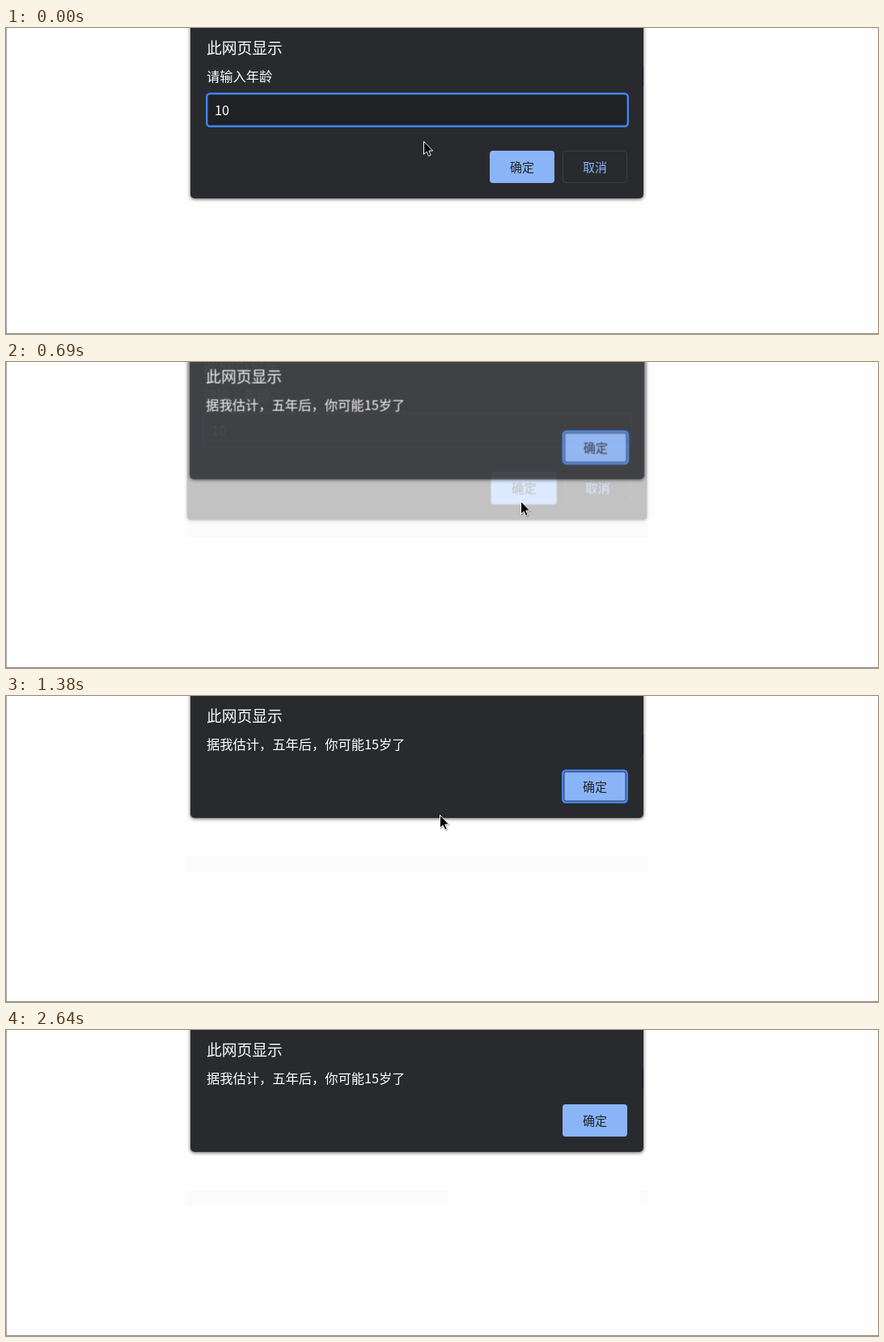
An HTML page for the animation above (2740 ms loop, 1078 by 379 pixels).

```html
<!DOCTYPE html>
<html lang="zh-CN">
<head>
<meta charset="utf-8">
<title>年龄</title>
<style>
  html, body { margin: 0; width: 100%; height: 100%; overflow: hidden; background: #fefefe; }
  svg { display: block; }
  text { font: 16.25px "Noto Sans CJK SC", "Noto Sans CJK", "Noto Sans", sans-serif; fill: #fff; }
  .title { font-size: 18.75px; }
  .label { font-size: 15px; fill: #202124; text-anchor: middle; }
  .link { fill: #8ab4f8; }
  .panel { fill: #292a2d; filter: drop-shadow(0 1px 2px rgba(0, 0, 0, .65)); }
  .button { fill: #8ab4f8; }
  .strip { fill: #fbfbfb; }
</style>
</head>
<body>
<svg width="1078" height="379" viewBox="0 0 1078 379">
  <path d="M0 0h1v379h-1z" fill="#a0a0a0"/>
  <path d="M0 378h1078v1h-1078z" fill="#8c8c8c"/>
  <g id="strips" class="strip">
    <path d="M222 199h324v18h-324zM784 199h10v18h-10z"/>
    <path id="stripMiddle" d="M546 199h238v18h-238z"/>
  </g>

  <g id="prompt">
    <rect class="panel" x="228" y="-20" width="560" height="231" rx="5"/>
    <text class="title" x="248" y="32">此网页显示</text>
    <text x="248" y="65.5">请输入年龄</text>
    <rect x="248.2" y="81.2" width="520.6" height="40.6" rx="4" fill="#202124" stroke="#4285f4" stroke-width="2.4"/>
    <text x="258" y="108">10</text>
    <path id="caret" d="M277 93h1v19h-1z" fill="#fff"/>
    <rect id="confirm" class="button" x="598" y="152" width="80" height="40" rx="4"/>
    <text class="label" x="638" y="178">确定</text>
    <circle id="ripple" cx="635" cy="172" r="13.5" fill="#5f7397" fill-opacity=".42"/>
    <rect x="688.5" y="152.5" width="79" height="39" rx="4" fill="none" stroke="#3c4043"/>
    <text class="label link" x="728" y="178">取消</text>
  </g>

  <g id="alert">
    <rect class="panel" x="228" y="-20" width="560" height="171" rx="5"/>
    <text class="title" x="248" y="32">此网页显示</text>
    <text x="248" y="65.5">据我估计，五年后，你可能15岁了</text>
    <rect class="button" x="688" y="92" width="80" height="40" rx="4"/>
    <g id="focus" fill="none">
      <rect x="688.2" y="92.2" width="79.6" height="39.6" rx="4" stroke="#4285f4" stroke-width="2.4"/>
      <rect x="689.9" y="93.9" width="76.2" height="36.2" rx="2.5" stroke="#202b45"/>
    </g>
    <text class="label" x="728" y="118">确定</text>
  </g>

  <path id="notch" d="M787 48h1v24h-1z" fill="#101113"/>
  <path id="cursor" d="M.5.5V16.5L4.1 13.2 6.6 18.6 9.2 17.5 6.8 12.1H11.6Z"
        fill="#000" stroke="#fff" stroke-width="1" style="filter: drop-shadow(1px 1px .5px rgba(0, 0, 0, .3))"/>
</svg>
<script>
const LOOP = 2740;

// Holds each value from its time until the next one; steps are [ms, value].
function play(id, property, steps) {
  const frames = steps.map(([ms, value]) => ({ offset: ms / LOOP, [property]: value, easing: 'step-end' }));
  frames.push({ offset: 1, [property]: steps.at(-1)[1] });
  document.getElementById(id).animate(frames, { duration: LOOP, iterations: Infinity });
}

const at = (x, y, scale = 1) => `translate(${x}px, ${y}px) scale(${scale})`;

play('cursor', 'transform', [
  [0, 516, 140], [150, 577, 166], [300, 618, 171], [450, 636, 172],
  [1110, 612, 168], [1230, 552, 155], [1380, 536, 147], [1510, 546, 156],
  [1660, 771, 265], [1810, 884, 325], [1960, 951, 362], [2110, 1100, 400]
].map(([ms, x, y]) => [ms, at(x, y)]));

play('caret', 'opacity', [[0, 0], [450, 1], [690, 0]]);
play('confirm', 'fill', [[0, '#8ab4f8'], [450, '#84a7e6'], [690, '#8ab4f8']]);
play('ripple', 'opacity', [[0, 0], [570, 1], [690, 0]]);

play('prompt', 'opacity', [[0, 1], [690, .28], [840, 0]]);
play('prompt', 'transform', [[0, at(0, 0)], [690, at(-8.1, -18.7, 1.016)], [840, at(0, 0)]]);
play('alert', 'opacity', [[0, 0], [690, .85], [840, 1]]);
play('alert', 'transform', [[0, at(0, 0)], [690, at(-1.8, -6.5, 1.0036)], [840, at(0, 0)]]);
play('notch', 'opacity', [[0, 1], [690, 0], [840, 1]]);

play('strips', 'opacity', [[0, 0], [690, 1]]);
play('stripMiddle', 'opacity', [[0, 1], [1660, 0]]);
play('focus', 'opacity', [[0, 1], [2640, 0]]);
</script>
</body>
</html>
```
